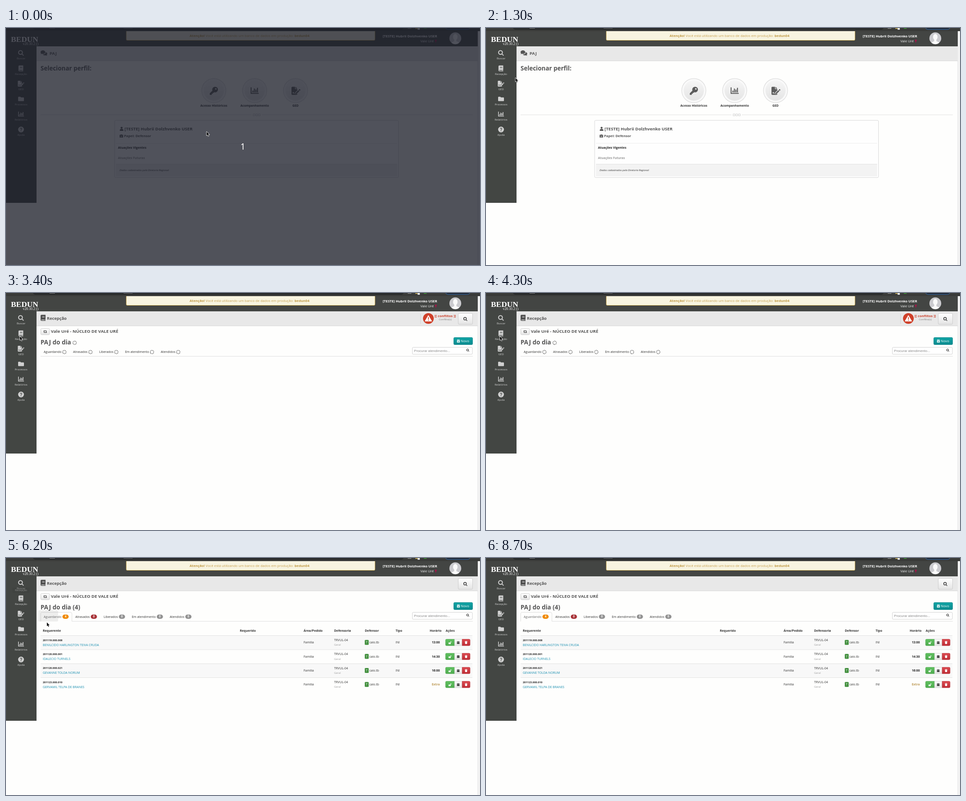
An HTML page with a canvas for the animation above (9.1 s loop, 1056 by 530 pixels).

```html
<!DOCTYPE html>
<html lang="pt-BR">
<head>
<meta charset="utf-8">
<title>Recepção</title>
<style>
html, body { margin: 0; width: 100%; height: 100%; overflow: hidden; background: #fefefd; }
canvas { display: block; }
</style>
</head>
<body>
<canvas id="stage" width="1056" height="530"></canvas>
<script>
const ctx = document.getElementById('stage').getContext('2d');
const LOOP = 9100, STEP = 100;
const SANS = '"Open Sans", "Noto Sans", sans-serif';
const SERIF = '"Liberation Serif", serif';
const ARIAL = '"Liberation Sans", sans-serif';
const USER = '[TESTE] Hubrii Dolzhvenko USER';
const DARK = '#333', GREY = '#555', LINE = '#dcdcdc';

// Icons on a 16-unit grid, filled with the even-odd rule
const ICONS = {
  search: 'M6.5 0a6.5 6.5 0 1 0 0 13a6.5 6.5 0 1 0 0-13zM6.5 2.5a4 4 0 1 0 0 8a4 4 0 1 0 0-8zM10.2 11.8l1.6-1.6 4 4-1.6 1.6z',
  book: 'M3.5 0H14v12.500h-.8v2H14V16H3.500A2.500 2.500 0 0 1 1 13.500v-11A2.500 2.500 0 0 1 3.500 0zM3.600 12.700h8.100v1.600H3.600a.8.8 0 0 1 0-1.600zM5 4h6.500v1H5zM5 6.200h6.500v1H5z',
  sign: 'M0 1.5A1.5 1.5 0 0 1 1.5 0H7v4.5h4.5v2.700L7 11.800V14h2.400l2.100-2v2.500a1.500 1.500 0 0 1-1.500 1.500h-8.500A1.500 1.500 0 0 1 0 14.500zM8 0l3.500 3.500H8zM8 12.200l5.600-5.600 2 2L10 14.200H8zM14.300 5.900l1-1a1 1 0 0 1 1.400 0l.6.6a1 1 0 0 1 0 1.400l-1 1zM2 12.500c1-2.500 2-2.500 2.400-1 .4.8 1 .8 1.600.6v1c-1.500.4-2.300 0-2.600-.8-.4.5-.6 1-.8 1.200z',
  folder: 'M0 3.5A1.5 1.5 0 0 1 1.5 2H6l2 2h6.5A1.5 1.5 0 0 1 16 5.5v7a1.5 1.5 0 0 1-1.5 1.5h-13A1.5 1.5 0 0 1 0 12.5z',
  chart: 'M0 1h1.8v11.2H16V14H0zM3.5 7.5h2V11h-2zM6.5 3.5h2V11h-2zM9.5 5.5h2V11h-2zM12.5 2h2v9h-2z',
  help: 'M8 0a8 8 0 1 0 0 16a8 8 0 1 0 0-16zM5 6a3 3 0 1 1 4.2 2.7c-.4.2-.5.4-.5.9H7.2c0-1.4.2-1.8 1.2-2.3A1.4 1.4 0 1 0 6.6 6zM7.1 10.7h1.8v1.8H7.1z',
  key: 'M10.5 0a5.5 5.5 0 1 1-1.6 10.7L7.6 12H6v1.8H4V16H0v-3.2l5.3-5.2A5.5 5.5 0 0 1 10.5 0zM12 2.6a1.5 1.5 0 1 0 .01 0z',
  user: 'M8 0a4 4 0 1 1 0 8a4 4 0 1 1 0-8zM1 16v-2.5A4.5 4.5 0 0 1 5.5 9h5A4.5 4.5 0 0 1 15 13.5V16z',
  bag: 'M5 3V1h6v2h5v5H0V3zM6.500 3h3V2.300h-3zM0 9h6v1.500h4V9h6v5.500H0z',
  chat: 'M6 1c3.300 0 6 2 6 4.600s-2.700 4.600-6 4.600c-1 0-2-.2-2.800-.5C2.300 10.400 1 10.800 0 10.800c.7-.7 1.200-1.600 1.300-2.200C.5 7.800 0 6.800 0 5.600 0 3 2.700 1 6 1zM13 5.600c2.300.6 4 2 4 4 0 1.200-.5 2-1.300 2.900.1.6.6 1.500 1.300 2.200-1 0-2.300-.4-3.200-1.100-.8.3-1.800.5-2.800.5-2.300 0-4.300-1-5.200-2.600C10 11.800 13 9 13 5.600z',
  cal: 'M1 2h3V0h2v2h4V0h2v2h3v3H1zM1 6h14v10H1z',
  calPlus: 'M1 2h3V0h2v2h4V0h2v2h3v3H1zM1 6h14v10H1zM7 8v2H5v2h2v2h2v-2h2v-2H9V8z',
  fileUp: 'M2 0h7v4.500h5V16H2zM10 0l4 3.500h-4zM8 6.500l-3.500 3.500H7v3.500h2V10h2.500z',
  trash: 'M1 1.500h4l.7-1.500h4.600l.7 1.500h4v2H1zM2 4.500h12L13.200 16H2.800z',
  unlock: 'M1 7.500h9V5a3.500 3.500 0 0 1 7 0v2.500h-2V5a1.500 1.500 0 0 0-3 0v2.500h1V16H1z',
  swap: 'M0 6l3-4 3 4H4v5h6l2 2H2V6zM16 10l-3 4-3-4h2V5H6L4 3h10v7z',
  arrow: 'M0 0V13.800L3.200 11 5.400 16 7.800 15 5.600 10.200H10z',
  hand: 'M4 0a1.300 1.300 0 0 1 1.300 1.300V6l5 1a2 2 0 0 1 1.700 2v3l-1.500 4H4.500L0 9.500 1.200 8l1.500 1.300v-8A1.300 1.300 0 0 1 4 0z'
};
for (const k in ICONS) ICONS[k] = new Path2D(ICONS[k]);

function icon(name, cx, cy, size, color) {
  ctx.save();
  ctx.translate(cx - size / 2, cy - size / 2);
  ctx.scale(size / 16, size / 16);
  ctx.fillStyle = color;
  ctx.fill(ICONS[name], 'evenodd');
  ctx.restore();
}

// y is the middle of the capitals; returns the width
function text(s, x, y, size, color, style = '', align = 'left', family = SANS) {
  ctx.font = `${style} ${size}px ${family}`;
  ctx.textAlign = align;
  ctx.fillStyle = color;
  ctx.fillText(s, x, y + size * 0.36);
  return ctx.measureText(s).width;
}
const bold = (s, x, y, size, color, align) => text(s, x, y, size, color, 'bold', align);

function rect(x, y, w, h, color) {
  ctx.fillStyle = color;
  ctx.fillRect(x, y, w, h);
}

function box(x, y, w, h, r, fill, stroke) {
  ctx.beginPath();
  ctx.roundRect(x, y, w, h, r);
  if (fill) { ctx.fillStyle = fill; ctx.fill(); }
  if (stroke) { ctx.strokeStyle = stroke; ctx.lineWidth = 0.8; ctx.stroke(); }
}

function disc(x, y, r, fill) {
  ctx.beginPath();
  ctx.arc(x, y, r, 0, 7);
  ctx.fillStyle = fill;
  ctx.fill();
}

function shade(y, h, top, bottom) {
  const g = ctx.createLinearGradient(0, y, 0, y + h);
  g.addColorStop(0, top);
  g.addColorStop(1, bottom);
  return g;
}

function spinner(x, y, t) {
  ctx.save();
  ctx.translate(x, y);
  ctx.rotate(t / STEP * 0.63);
  ctx.beginPath();
  ctx.arc(0, 0, 3.9, 0, 7);
  ctx.setLineDash([2.1, 0.96]);
  ctx.lineWidth = 1;
  ctx.strokeStyle = '#444';
  ctx.stroke();
  ctx.restore();
}

function browser() {
  rect(0, 0, 1056, 7, '#3a3b39');
  box(60, -10, 826, 14, 6, '#282a2b');
  rect(97, 0, 12, 0.8, '#999');
  rect(262, 0, 20, 0.8, '#777');
  rect(895, 0, 8, 1.5, '#888');
  rect(912, 0, 6, 2, '#b8a050');
  rect(917, 0, 5, 4, '#ddd');
  rect(931, 0, 6, 1.5, '#3a9a30');
  box(979, -10, 55, 13.5, 6, '#202b3c', '#3f7fc4');
}

function avatar(x, y) {
  ctx.save();
  ctx.beginPath();
  ctx.arc(x, y, 13.2, 0, 7);
  ctx.clip();
  rect(x - 14, y - 14, 28, 28, '#cbcbcf');
  ctx.fillStyle = '#fafafa';
  ctx.beginPath();
  ctx.ellipse(x, y - 3, 5, 6.8, 0, 0, 7);
  ctx.fill();
  rect(x - 2.5, y + 2, 5, 6, '#fafafa');
  ctx.beginPath();
  ctx.ellipse(x, y + 13, 10, 6.5, 0, 0, 7);
  ctx.fill();
  ctx.restore();
}

const MENU = [['search', 'Buscar'], ['book', 'Recepção'], ['sign', 'GED'],
  ['folder', 'Processos'], ['chart', 'Relatórios'], ['help', 'Ajuda']];

function frame(sideEnd) {
  rect(0, 0, 1056, 530, '#fefefd');
  rect(1051, 7, 5, 523, '#f2f2f2');
  rect(1050.5, 7, 0.6, 523, '#ddd');
  browser();
  rect(0, 7, 1051, 34, '#434543');
  rect(0, 40, 68, sideEnd - 40, '#434643');
  rect(68, 41, 983, 32.500, '#e8e8e8');
  rect(68, 73, 983, 0.8, '#d2d2d2');

  text('BEDUN', 11, 24.500, 17.4, '#fff', 'bold', 'left', SERIF);
  text('v20.10.2 ()', 72, 35, 7.8, '#fff', '', 'right', SERIF);

  box(268, 5, 554, 22.500, 2, '#f8f4e0', '#e3b94c');
  rect(267, 3.500, 556, 3.500, '#3a3b39');
  let x = 409;
  x += bold('Atenção!', x, 17, 7.7, '#c09a45');
  x += text(' Você está utilizando um banco de dados em produção: ', x, 17, 7.7, '#c6a04e');
  bold('bedun04', x, 17, 7.7, '#c09a45');

  bold(USER, 960.5, 18, 7.7, '#fff', 'right');
  text('Vale Uré', 953, 29, 7.7, '#f2f2f2', '', 'right');
  disc(957.500, 28, 2.2, '#a01848');
  rect(956.800, 29, 1.500, 4, '#a01848');
  avatar(1001, 23);

  MENU.forEach(([name, label], i) => {
    const y = 56 + i * 34.2;
    icon(name, name === 'sign' ? 32.800 : 33.500, y, 13, '#d0d0d0');
    text(label, 33.500, y + 12.2, 6.05, '#d6d6d6', '', 'center');
  });
}

function profilePage() {
  frame(391);
  icon('chat', 84, 56, 14, GREY);
  bold('PAJ', 97, 57, 9.35, GREY);
  bold('Selecionar perfil:', 77, 90.5, 13.475, GREY);

  [['key', 'Acesso Históricos'], ['chart', 'Acompanhamento'], ['sign', 'GED']].forEach(([name, label], i) => {
    const x = 463 + i * 91;
    disc(x, 140, 27.500, '#d6d6d6');
    disc(x, 140, 26.500, '#f9f9f9');
    disc(x, 140, 22.500, shade(117, 46, '#f6f6f6', '#e4e4e4'));
    icon(name, x, 140.500, 18, '#5c5c5c');
    bold(label, x, 173.300, 6.9, DARK, 'center');
  });

  rect(77, 193.700, 470, 0.9, LINE);
  rect(570, 193.700, 470, 0.9, LINE);
  for (let i = 0; i < 3; i++) box(550.500 + i * 6, 192.300, 4, 4, 0, '#fff', '#c4c4c4');

  box(242, 206.500, 632.500, 128, 2.500, '#fefefe', '#d0d0d0');
  icon('user', 257.500, 225.500, 9, GREY);
  bold(USER, 264, 225.5, 9.625, GREY);
  icon('bag', 257, 241.500, 8, GREY);
  bold('Papel: Defensor', 263, 241.5, 7.7, GREY);
  rect(245, 257.500, 626.500, 0.7, '#e6e6e6');
  bold('Atuações Vigentes', 249.500, 267.800, 6.9, '#222');
  bold('Atuações Futuras', 249.500, 291, 6.9, '#999');
  rect(245, 304, 626.500, 28, '#f3f3f3');
  rect(245, 304, 626.500, 0.8, '#dedede');
  text('Dados cadastrados pela Diretoria Regional', 253, 318.300, 5.85, DARK, 'italic');
}

// Mark after a tab label; returns its width
function mark(kind, x, color, t) {
  if (kind === 'spin') { spinner(x + 4.400, 132, t); return 8.800; }
  if (kind === 'dash') { box(x, 130.500, 10, 3, 1.500, color); return 10; }
  box(x, 126.500, 13.800, 9.500, 4.700, color);
  bold(kind, x + 6.900, 131.3, 6.1, '#fff', 'center');
  return 13.800;
}

function tabs(marks, active, t) {
  rect(77, 141, 963, 0.9, LINE);
  if (active) {
    const w = marks[0] === 'spin' ? 64.500 : 69.500;
    box(77.300, 121.500, w, 24, 3, '#fefefd', '#d6d6d6');
    rect(76, 141.900, w + 3, 5, '#fefefd');
  }
  const colors = ['#f08a00', '#a83338', '#929292', '#929292', '#929292'];
  let x = 84;
  ['Aguardando', 'Atrasados', 'Liberados', 'Em atendimento', 'Atendidos'].forEach((label, i) => {
    x += text(label, x, 131.5, 6.9, active && !i ? '#666' : DARK) + 2.200;
    x += mark(marks[i], x, colors[i], t) + 15;
  });
}

function deskHead(loaded, t, sideEnd) {
  frame(sideEnd);
  icon('book', 83, 55.500, 13.500, '#4d4d4d');
  bold('Recepção', 91, 57, 9.35, GREY);
  box(1007.500, 45.500, 32, 24.500, 2.500, shade(45, 25, '#fff', '#e4e4e4'), '#c6c6c6');
  icon('search', 1023.500, 58.300, 9, DARK);
  box(77.500, 79.500, 19.500, 13.700, 2, shade(79, 14, '#fff', '#e6e6e6'), '#c6c6c6');
  icon('swap', 87.300, 86.500, 8, DARK);
  bold('Vale Uré - NÚCLEO DE VALE URÉ', 100, 86, 9.625, GREY);
  const w = bold(loaded ? 'PAJ do dia (4)' : 'PAJ do dia', 77, 110.5, 13.475, GREY);
  if (!loaded) spinner(77 + w + 8, 111.300, t);
  box(997.500, 99.500, 42, 16, 2, shade(99, 16, '#10a5a5', '#0b8b8f'), '#0a8186');
  icon('calPlus', 1007.800, 107.300, 7, '#fff');
  text('Novo', 1013, 107.5, 7.7, '#fff');
  box(905.400, 121.500, 133.600, 15.500, 2, '#fff', '#c8c8c8');
  text('Procurar atendimento...', 909, 129.5, 7.7, '#8b8b8b', '', 'left', ARIAL);
  icon('search', 1029, 128, 6.500, DARK);
}

function conflict() {
  rect(923, 47, 0.8, 22, '#cfcfcf');
  disc(941, 57, 12, '#cf4029');
  ctx.beginPath();
  ctx.moveTo(941, 50);
  ctx.lineTo(948.500, 63);
  ctx.lineTo(933.500, 63);
  ctx.closePath();
  ctx.fillStyle = ctx.strokeStyle = '#fff';
  ctx.lineWidth = 1;
  ctx.lineJoin = 'round';
  ctx.fill();
  ctx.stroke();
  rect(940.200, 54, 1.700, 4.800, '#cf4029');
  rect(940.200, 60, 1.700, 1.700, '#cf4029');
  bold('[[ conflitos ]]', 978.500, 51, 7.7, '#c9402b', 'center');
  text('Conflito(s)', 978.500, 59.3, 6.05, '#777', '', 'center');
}

function heads(xs) {
  ['Requerente', 'Requerido', 'Área/Pedido', 'Defensoria', 'Defensor', 'Tipo', 'Horário', 'Ações']
    .forEach((s, i) => bold(s, xs[i], 162.5, 6.9, DARK));
}

function emptyTable() {
  heads([82, 372.5, 634, 702.5, 771, 839, 978.5, 1014]);
  rect(77, 173, 962, 19.500, '#f8f8f8');
  rect(77, 173, 962, 0.8, LINE);
  text('Nenhum registro encontrado', 82, 183.2, 6.9, DARK);
}

const ROWS = [
  ['201119.000.008', 'BENILCIDO HARLINGTON TEIVA CRUDA', '13:00'],
  ['201120.000.001', 'IDALECIO TURNELS', '14:30'],
  ['201120.000.021', 'GEVANNE TOLDA NORUM', '16:00'],
  ['201123.000.010', 'GERVAMIL TELPA DE BRANES', 'Extra']
];

function fullTable() {
  heads([82, 521, 663, 731, 799.5, 868, 944, 979.5]);
  ROWS.forEach(([id, name, hour], i) => {
    const y = 188.700 + i * 31.350, top = y - 15.500;
    if (i % 2 === 0) rect(77, top, 962, 31.350, '#f8f8f8');
    rect(77, top, 962, 0.8, LINE);
    bold(id, 82, y - 5.2, 5.9, '#222');
    text(name, 82, y + 5.5, 6.9, '#1a8fb0');
    text('Família', 663, y, 6.9, DARK);
    text('TRVUL-04', 731, y - 5.2, 6.9, DARK);
    text('Geral', 731, y + 5.5, 5.9, '#999');
    box(799.300, y - 5.500, 8.700, 11, 1.500, '#43903f');
    text('T', 803.700, y, 6.9, '#fff', '', 'center');
    text('caio.tb', 809.500, y, 6.9, DARK);
    text('INI', 868, y, 6.9, DARK);
    bold(hour, 957.500, y, 6.9, hour === 'Extra' ? '#bd9a55' : '#222', 'center');
    box(979.300, y - 7, 20, 14.300, [2, 0, 0, 2], shade(y - 7, 14, '#60c160', '#4fab4f'), '#4fa64f');
    box(999.300, y - 7, 17, 14.300, 0, shade(y - 7, 14, '#fff', '#e6e6e6'), '#cfcfcf');
    box(1016.300, y - 7, 17.500, 14.300, [0, 2, 2, 0], shade(y - 7, 14, '#dc4a50', '#bd2c35'), '#b62f36');
    icon('unlock', 988.800, y + 0.500, 6.500, '#fff');
    icon('cal', 1007.500, y + 0.300, 6.500, '#444');
    icon('trash', 1025, y + 0.300, 6.500, '#fff');
  });
}

function submenu(alpha) {
  ctx.globalAlpha = alpha;
  box(14.500, 66, 38.500, 12, 2, '#3c3f3c');
  text('Recepção', 33.500, 72.2, 6.05, '#dadada', '', 'center');
  ctx.shadowColor = 'rgba(0,0,0,.35)';
  ctx.shadowBlur = 4;
  box(60.500, 76, 116, 32, 2, '#fff');
  ctx.shadowBlur = 0;
  ctx.shadowColor = 'transparent';
  ctx.beginPath();
  ctx.moveTo(61, 86.500);
  ctx.lineTo(55, 92);
  ctx.lineTo(61, 97.500);
  ctx.fill();
  box(60.500, 76, 116, 32, 2, null, '#d0d0d0');
  rect(123.700, 76, 0.8, 32, '#d0d0d0');
  icon('calPlus', 91, 88, 13, GREY);
  icon('fileUp', 151, 88, 13, GREY);
  text('Novo Agendamento', 91, 100.2, 6.05, '#666', '', 'center');
  text('Doc. Pendentes', 151, 100.2, 6.05, '#666', '', 'center');
  ctx.globalAlpha = 1;
}

function fadingMenu() {
  box(72, 117, 44, 25, 2, 'rgba(60,60,60,.08)');
  box(14.500, 66, 38.500, 12, 2, 'rgba(60,63,60,.4)');
  text('Recepção', 33.500, 72.2, 6.05, 'rgba(214,214,214,.5)', '', 'center');
}

// Pointer stops: time, x, y
const STOPS = [[0, 447, 232], [600, 447, 232], [900, 169, 155], [1000, 169, 155], [1400, 31, 97],
  [6100, 31, 97], [6200, 91, 144], [6400, 91, 144], [6800, 972, 187], [6900, 972, 187],
  [7100, 1024, 215], [7200, 1020, 275], [7600, 127, 299], [8100, 127, 299], [8300, 195, 186],
  [8400, 195, 186], [8700, -9, 2]];

function pointer(t) {
  const i = STOPS.findIndex(s => s[0] > t);
  if (i < 0) return;
  const [t0, x0, y0] = STOPS[i - 1], [t1, x1, y1] = STOPS[i];
  const p = (t - t0) / (t1 - t0);
  ctx.save();
  ctx.translate(x0 + (x1 - x0) * p, y0 + (y1 - y0) * p);
  ctx.scale(0.62, 0.62);
  const shape = ICONS[t >= 1400 && t < 2900 ? 'hand' : 'arrow'];
  ctx.strokeStyle = '#fff';
  ctx.lineWidth = 2.2;
  ctx.lineJoin = 'round';
  ctx.stroke(shape);
  ctx.fillStyle = '#111';
  ctx.fill(shape);
  ctx.restore();
}

function draw(t) {
  if (t < 2900) {
    profilePage();
    if (t > 1400) submenu(1 - (1 - Math.min(1, (t - 1400) / 1000)) ** 2.3);
  } else if (t < 4900) {
    deskHead(false, t, 359);
    conflict();
    tabs(Array(5).fill('spin'), false, t);
  } else if (t < 5300) {
    deskHead(false, t, 359);
    tabs(['spin', 'dash', 'dash', 'dash', 'dash'], true, t);
    emptyTable();
  } else {
    deskHead(true, t, 364);
    const rest = t < 5500 ? 'dash' : '0';
    tabs(['4', '0', rest, rest, rest], true, t);
    fullTable();
    if (t === 6200) fadingMenu();
  }
  if (t < 100) {
    rect(0, 0, 1056, 530, 'rgba(28,31,42,.77)');
    text('1', 527.800, 265, 19, '#fff', '', 'center', '"Noto Sans", sans-serif');
  }
  pointer(t);
}

function tick() {
  draw(Math.floor(performance.now() % LOOP / STEP) * STEP);
  requestAnimationFrame(tick);
}
tick();
</script>
</body>
</html>
```
